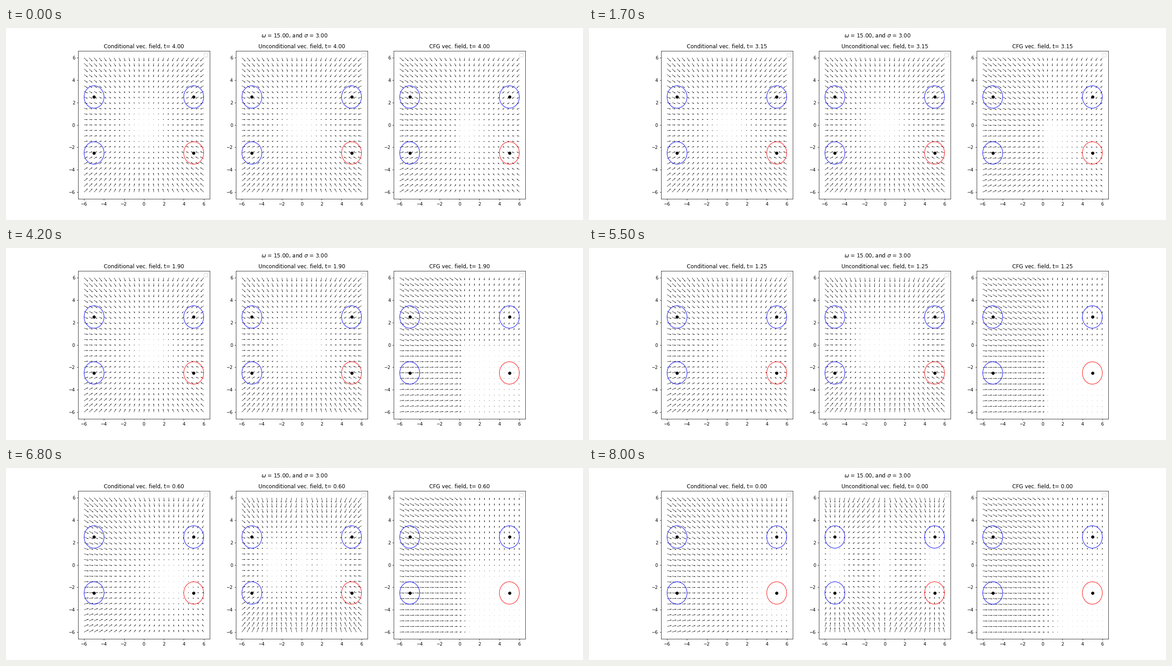
Write a matplotlib script that moves like this. It is 1280 by 427 pixels and loops after 8100 ms.

```python
import numpy as np
import matplotlib.pyplot as plt
from matplotlib.animation import FuncAnimation
from matplotlib.patches import Circle

W, H, DPI = 1280, 427, 1280 / 18
FRAMES, STEP_MS = 81, 100
OMEGA, SIGMA = 15.0, 3.0
T_MAX = 4.0
MEAN = np.array([5.0, -2.5])

axis = np.linspace(-6, 6, 25)
X, Y = np.meshgrid(axis, axis)
GRID = np.stack([X, Y])


def fields(t):
    """Scores of the chosen class, of the four-class mixture, and guided."""
    decay = np.exp(-t)
    m = (MEAN * decay)[:, None, None]
    var = (SIGMA * decay) ** 2
    cond = m - GRID
    uncond = m * np.tanh(m * GRID / var) - GRID
    return cond, uncond, cond + OMEGA * (cond - uncond)


fig, axes = plt.subplots(1, 3, figsize=((W + 0.01) / DPI, (H + 0.01) / DPI), dpi=DPI)
fig.suptitle(rf"$\omega$ = {OMEGA:.2f}, and $\sigma$ = {SIGMA:.2f}")
names = ["Conditional", "Unconditional", "CFG"]

arrows = []
for ax in axes:
    arrows.append(ax.quiver(X, Y, X, Y))
    for cx in (-5, 5):
        for cy in (-2.5, 2.5):
            color = "red" if (cx, cy) == tuple(MEAN) else "blue"
            ax.plot(cx, cy, "o", color="black")
            ax.add_patch(Circle((cx, cy), 1, fill=False, edgecolor=color))
    ax.set(xlim=(-6.6, 6.6), ylim=(-6.6, 6.6))
    ax.set_xticks(range(-6, 7, 2))
    ax.set_yticks(range(-6, 7, 2))
    ax.legend([], [], loc="upper right")


def update(i):
    t = T_MAX * (1 - i / (FRAMES - 1))
    for ax, name, quiver, (u, v) in zip(axes, names, arrows, fields(t)):
        quiver.set_UVC(u, v)
        quiver.scale = None  # rescale to the mean arrow length
        ax.set_title(f"{name} vec. field, t= {t:.2f}")
    return arrows


anim = FuncAnimation(fig, update, frames=FRAMES, interval=STEP_MS,
                     repeat=True, repeat_delay=0, blit=False)
plt.show()
```
